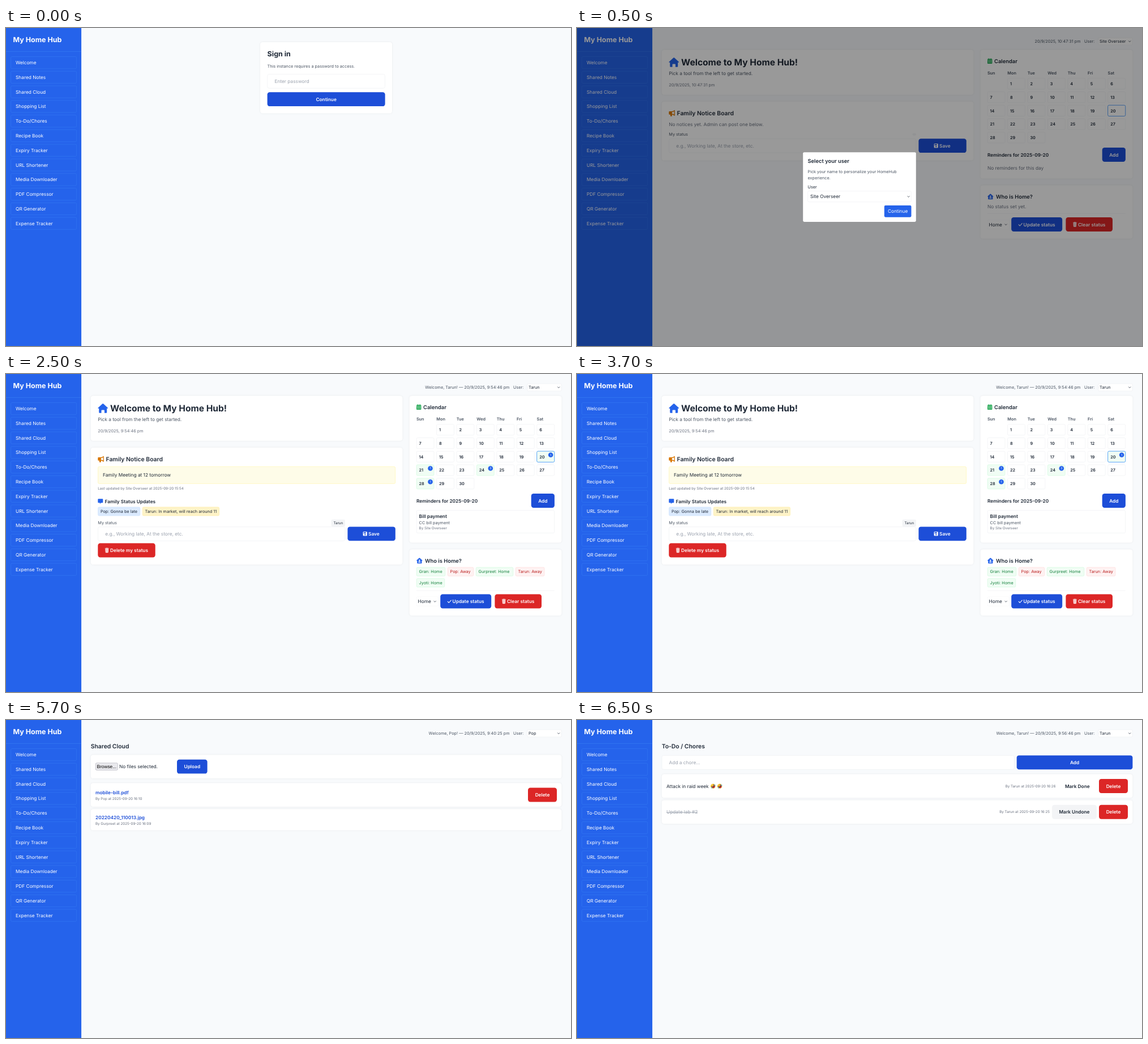
Recreate the animation shown at these times as an HTML page. Size 998 by 561 pixels, loop 8000 ms.

```html
<!DOCTYPE html>
<html lang="en">
<head>
<meta charset="utf-8">
<title>My Home Hub</title>
<style>
html, body { margin: 0; width: 100%; height: 100%; overflow: hidden; background: #f8fafc; }
svg { display: block; width: 100vw; height: 100vh; }
text { font-family: Inter, "Open Sans", sans-serif; font-optical-sizing: none; text-rendering: geometricPrecision; white-space: pre; }
.card { filter: drop-shadow(0 .6px 1.4px rgba(0, 0, 0, .07)); }
</style>
</head>
<body>
<svg id="stage" viewBox="0 0 998 561" preserveAspectRatio="none"></svg>
<script>
const K = 998 / 1920; // page pixels to stage units
const INK = '#1f2937', SLATE = '#4b5563', GRAY = '#6b7280', PALE = '#9ca3af', LINE = '#e5e7eb';
const BLUE = '#2563eb', DEEP = '#1d4ed8', RED = '#dc2626';
const ADMIN = 'Site Overseer', SON = 'Tarun', FATHER = 'Pop', COUSIN = 'Gurpreet';

// y is the middle of the capital letters
const text = (x, y, s, px, fill = INK, weight = 400, extra = '') =>
  `<text x="${x}" y="${y + px * K * .364}" font-size="${px * K}" fill="${fill}" font-weight="${weight}" ${extra}>${s}</text>`;
const bold = (x, y, s, px = 16, fill = INK, extra = '') => text(x, y, s, px, fill, 600, extra);
const END = 'text-anchor="end"', MID = 'text-anchor="middle"';

const rect = (x, y, x2, y2, fill, r = 0, extra = '') =>
  `<rect x="${x}" y="${y}" width="${x2 - x}" height="${y2 - y}" rx="${r}" fill="${fill}" ${extra}/>`;
const box = (x, y, x2, y2, fill, line = LINE, r = 2, w = .42) =>
  rect(x + w / 2, y + w / 2, x2 - w / 2, y2 - w / 2, fill, r, `stroke="${line}" stroke-width="${w}"`);
const card = (x, y, x2, y2) => rect(x, y, x2, y2, '#fff', 4.16, 'class="card"');
const path = (d, fill, extra = '') => `<path d="${d}" fill="${fill}" ${extra}/>`;
const stroke = (d, color, w) => path(d, 'none', `stroke="${color}" stroke-width="${w}" stroke-linecap="round" stroke-linejoin="round"`);
const at = (x, y, body, k = 1) => `<g transform="translate(${x} ${y}) scale(${k})">${body}</g>`;

const button = (x, y, x2, label, fill = DEEP, color = '#fff') =>
  rect(x, y, x2, y + 24.9, fill, 4.16) + bold((x + x2) / 2, y + 12.5, label, 16, color, MID);
const iconButton = (x, y, x2, icon, gap, label, fill) =>
  rect(x, y, x2, y + 24.9, fill, 4.16) + at(x + gap[0], y + 12.5, icon) + bold(x + gap[1], y + 12.5, label, 16, '#fff');
const input = (x, y, x2, hint) => box(x, y, x2, y + 25.2, '#fff', LINE, 3) + text(x + 12.9, y + 12.6, hint, 16, PALE);
const chevron = (x, y) => stroke(`M${x - 1.7} ${y - .8}l1.7 1.7l1.7-1.7`, INK, .75);
const chip = (x, y, x2, s, [fill, line, color]) =>
  box(x, y, x2, y + 15.7, fill, line) + text(x + 4.6, y + 7.9, s, 14, color);

// Icons centred on the vertical axis, starting at x = 0
const FLOPPY = rect(0, -3.7, 7.3, 3.7, '#fff', 1) + rect(1.2, -2.7, 5.2, -.7, DEEP, .2) + `<circle cx="3.65" cy="1.5" r="1.1" fill="${DEEP}"/>`;
const TRASH = rect(0, -3.8, 6.8, -2.8, '#fff', .4) + rect(2.1, -4.3, 4.7, -3.2, '#fff', .4)
  + path('M.5-2.3h5.8l-.4 5.5q-.1.9-.9.9h-3.200q-.8 0-.9-.9z', '#fff')
  + stroke('M2-1v3.700M3.400-1v3.700M4.800-1v3.700', RED, .4);
const CHECK = stroke('M.6.3l2.100 2.100l4-4.400', '#fff', 1.1);
const HOUSE = path('M9 0q.5 0 .8.300L17.700 7.500q.6.900-.5 1.100h-1.200v6.900q0 1-1 1h-3.300v-4.300q0-1-1-1h-3.400q-1 0-1 1v4.300h-3.300q-1 0-1-1v-6.900h-1.200q-1.100-.2-.5-1.100L8.200.300q.3-.3.8-.3z', BLUE);
const HOME_USER = path('M9 0q.5 0 .8.300L17.700 7.500q.6.900-.5 1.100h-1.200v6.900q0 1-1 1h-12q-1 0-1-1v-6.900h-1.200q-1.100-.2-.5-1.100L8.200.300q.3-.3.8-.3z', BLUE)
  + '<circle cx="9" cy="7.400" r="2" fill="#fff"/>' + path('M5.300 13.700q0-3.300 3-3.300h1.400q3 0 3 3.300z', '#fff');
const HORN = path('M0 3.300q0-1 1-1h4q2.600-.1 4.700-2.100q.5-.4.800.3v9.200q-.3.700-.8.300q-1.900-1.800-4.200-2.100v2.300q0 .7-.7.700h-1.500q-.7 0-.7-.7v-2.300h-1.600q-1 0-1-1z', '#d97706')
  + path('M5.500 3.700q2.100-.2 3.700-1.400v5.400q-1.600-1.100-3.700-1.300z', '#fff');
const COMMENT = path('M1 0h7q1 0 1 1v5q0 1-1 1h-2.300l-2.200 1.800v-1.800h-2.500q-1 0-1-1v-5q0-1 1-1z', BLUE);
const CALENDAR = rect(0, 1.2, 8.4, 9.500, '#16a34a', 1) + rect(1.8, 0, 2.800, 2.500, '#16a34a', .4) + rect(5.600, 0, 6.600, 2.500, '#16a34a', .4)
  + rect(0, 3.1, 8.4, 3.6, '#fff')
  + [0, 1, 2].map(i => rect(1.1 + i * 2.400, 4.700, 2.500 + i * 2.400, 5.900, '#fff', .2) + rect(1.1 + i * 2.400, 7, 2.500 + i * 2.400, 8.200, '#fff', .2)).join('');
const LAUGH = '<g transform="rotate(-40)"><circle r="4.300" fill="#ffc83d"/>'
  + path('M-2.800.1h5.600q-.2 3.400-2.800 3.400t-2.800-3.400z', '#7a2436') + path('M-1.700 2.600q1.700-1.500 3.400 0q-1.700 1.600-3.400 0z', '#f03a50')
  + stroke('M-2.700-1.700l1.500.7l-1.500.6M2.700-1.700l-1.500.7l1.500.6', '#50321e', .6)
  + '<circle cx="-3.500" cy=".8" r="1" fill="#3f9ee8"/><circle cx="3.500" cy=".8" r="1" fill="#3f9ee8"/></g>';

const GREEN_TAG = ['#f0fdf4', '#bbf7d0', '#15803d'], RED_TAG = ['#fef2f2', '#fecaca', '#b91c1c'];

function sidebar() {
  const items = ['Welcome', 'Shared Notes', 'Shared Cloud', 'Shopping List', 'To-Do/Chores', 'Recipe Book', 'Expiry Tracker',
    'URL Shortener', 'Media Downloader', 'PDF Compressor', 'QR Generator', 'Expense Tracker'];
  return rect(0, 0, 133.07, 561, BLUE) + text(12.5, 20.9, 'My Home Hub', 24, '#fff', 700)
    + rect(0, 41.5, 133.07, 42, '#3b82f6')
    + items.map((s, i) => {
      const y = 50.3 + i * 25.78;
      return box(8.3, y, 124.8, y + 21.6, 'none', '#3b82f6') + text(17.05, y + 10.8, s, 16, '#fff');
    }).join('');
}

const topBar = (status, user) => text(889.5, 23.5, status, 14, SLATE, 400, END) + text(896, 23.5, 'User:', 14, SLATE)
  + box(920.5, 16.800, 981.4, 30.200, '#fff') + text(923, 23.5, user, 14) + chevron(976.2, 23.600);

function signIn() {
  return card(449.1, 24.950, 682, 150.6) + text(461.6, 45.9, 'Sign in', 24, INK, 700)
    + text(461.6, 67.8, 'This instance requires a password to access.', 14, SLATE)
    + input(461.6, 81.3, 669.600, 'Enter password') + button(461.6, 113.200, 669.600, 'Continue');
}

function month(counts) {
  const left = 724.9, step = 35.44;
  let out = ['Sun', 'Mon', 'Tue', 'Wed', 'Thu', 'Fri', 'Sat'].map((d, i) => bold(left + i * step, 79.4, d, 14, SLATE)).join('');
  for (let day = 1; day <= 30; day++) {
    const x = left + day % 7 * step, y = 88.6 + Math.floor(day / 7) * 23.75, n = counts[day];
    out += box(x, y, x + 31.3, y + 19.5, n ? '#f0fdf4' : '#fff', n ? '#bbf7d0' : LINE);
    if (day === 20) out += box(x - .4, y - .4, x + 31.7, y + 19.900, 'none', '#60a5fa', 2.200, 1);
    out += bold(x + 4.600, y + 9.8, day, 14);
    if (n) out += `<circle cx="${x + 24.6}" cy="${y + 6.600}" r="4.300" fill="${BLUE}"/>` + text(x + 24.6, y + 6.600, n, 10, '#fff', 400, MID);
  }
  return out;
}

const saveRow = y => text(162.3, y - 7.400, 'My status', 14, SLATE)
  + input(162.3, y, 599, 'e.g., Working late, At the store, etc.')
  + iconButton(603.4, y, 687.800, FLOPPY, [27.200, 36.700], 'Save', DEEP);

const homeControls = y => rect(725, y - 6.800, 968.9, y - 6.400, LINE)
  + box(725, y + 4, 763.500, y + 21, '#fff', '#f3f4f6') + text(727.5, y + 12.5, 'Home', 16) + chevron(757.600, y + 12.700)
  + iconButton(767.2, y, 857.2, CHECK, [12.400, 21.400], 'Update status', DEEP)
  + iconButton(863.4, y, 946, TRASH, [12.600, 21.600], 'Clear status', RED);

function dashboard(d) {
  return topBar(d.status, d.user)
    + card(149.7, 38.600, 700.4, 117.700) + at(162.2, 52.2, HOUSE)
    + text(184, 60.6, 'Welcome to My Home Hub!', 30, INK, 700)
    + text(162.3, 80.4, 'Pick a tool from the left to get started.', 16, SLATE)
    + text(162.3, 100.4, d.time, 14, GRAY)
    + card(149.7, 129.800, 700.4, d.boardEnd) + at(162.3, 144.8, HORN) + bold(176.5, 150.1, 'Family Notice Board', 20)
    + card(712.6, 38.600, 981.4, d.calEnd) + at(725, 53.4, CALENDAR) + bold(737, 58.600, 'Calendar', 18)
    + month(d.counts) + bold(725, 223.600, 'Reminders for 2025-09-20') + button(927.700, 211, 968.9, 'Add')
    + card(712.6, d.calEnd + 12, 981.4, d.homeEnd) + at(725, d.calEnd + 26.900, HOME_USER, .59)
    + bold(740, d.calEnd + 31.900, 'Who is Home?', 18) + homeControls(d.controls) + d.body;
}

function pickUser() {
  const time = '20/9/2025, 10:47:31 pm';
  return dashboard({
    status: time, time, user: ADMIN, boardEnd: 233.600, calEnd: 265.600, homeEnd: 371.600, controls: 334.1, counts: {},
    body: text(162.3, 169.6, 'No notices yet. Admin can post one below.', 16, GRAY) + saveRow(195.2)
      + rect(592.500, 185.500, 599, 189.800, '#f3f4f6', 2)
      + text(725, 246.500, 'No reminders for this day', 16, GRAY) + text(725, 315, 'No status set yet.', 16, GRAY)
  }) + rect(0, 0, 998, 561, '#000', 0, 'opacity=".4"')
    + rect(399.2, 219.2, 598.800, 341.9, '#fff', 2.1)
    + bold(407.5, 234.800, 'Select your user', 18)
    + text(407.5, 253.700, 'Pick your name to personalize your HomeHub', 14, SLATE) + text(407.5, 264.1, 'experience.', 14, SLATE)
    + text(407.5, 280.600, 'User', 14) + box(407.5, 287.600, 590.500, 307, '#fff') + text(412, 297.300, ADMIN, 16)
    + chevron(585.600, 297.500) + rect(542.8, 313, 590.500, 333.700, BLUE, 2.1) + text(566.600, 323.300, 'Continue', 16, '#fff', 400, MID);
}

function home() {
  const time = '20/9/2025, 9:54:46 pm';
  return dashboard({
    status: `Welcome, ${SON}! — ${time}`, time, user: SON, boardEnd: 336.200, calEnd: 297.500, homeEnd: 426.200, controls: 388.6,
    counts: { 20: 1, 21: 1, 24: 3, 28: 1 },
    body: box(162.3, 163.2, 687.800, 193.600, '#fefce8', '#fef08a') + text(171, 178.400, 'Family Meeting at 12 tomorrow', 16)
      + text(162.3, 201.500, `Last updated by ${ADMIN} at 2025-09-20 15:54`, 12, GRAY)
      + at(162.3, 220.300, COMMENT) + bold(174.500, 224.600, 'Family Status Updates')
      + chip(162.3, 234.600, 237, `${FATHER}: Gonna be late`, ['#dbeafe', '#bfdbfe', INK])
      + chip(241, 234.600, 376.800, `${SON}: In market, will reach around 11`, ['#fef3c7', '#fde68a', INK])
      + rect(574.500, 256.800, 599, 269, '#f3f4f6', 2) + text(586.800, 263, SON, 12, INK, 400, MID)
      + saveRow(269.4) + iconButton(162.3, 298.6, 263.700, TRASH, [12.500, 21.700], 'Delete my status', RED)
      + box(725, 240.400, 968.9, 280.700, '#fff') + bold(729.600, 251.300, 'Bill payment')
      + text(729.600, 262.500, 'CC bill payment', 14, SLATE) + text(729.600, 272.100, `By ${ADMIN}`, 12, GRAY)
      + chip(725, 340.900, 776, 'Gran: Home', GREEN_TAG) + chip(780, 340.900, 826, `${FATHER}: Away`, RED_TAG)
      + chip(830, 340.900, 896, `${COUSIN}: Home`, GREEN_TAG) + chip(900, 340.900, 951.300, `${SON}: Away`, RED_TAG)
      + chip(725, 360.500, 775, 'Jyoti: Home', GREEN_TAG)
  });
}

function cloud() {
  return topBar(`Welcome, ${FATHER}! — 20/9/2025, 9:40:25 pm`, FATHER) + bold(149.7, 46.400, 'Shared Cloud', 20)
    + card(149.7, 61.500, 981.4, 103.100) + box(158, 75.600, 197.600, 88.700, '#e9e9ed', '#8f8f9d')
    + text(177.800, 82.200, 'Browse...', 16, '#000', 400, MID + ' style="font-family:\'Liberation Sans\',Arial,sans-serif"')
    + text(200, 82.400, 'No files selected.', 16) + button(302, 69.700, 355.600, 'Upload')
    + card(149.7, 111.300, 981.4, 153) + bold(158, 128.300, 'mobile-bill.pdf', 16, DEEP)
    + text(158, 139, `By ${FATHER} at 2025-09-20 16:10`, 12, GRAY) + button(922, 119.600, 973, 'Delete', RED)
    + card(149.7, 157.200, 981.4, 194.600) + bold(158, 171.800, '20220420_110013.jpg', 16, DEEP)
    + text(158, 182.400, `By ${COUSIN} at 2025-09-20 16:09`, 12, GRAY);
}

function chores() {
  const meta = (x, y, time) => text(x, y, `By ${SON} at 2025-09-20 ${time}`, 12, GRAY, 400, END);
  return topBar(`Welcome, ${SON}! — 20/9/2025, 9:56:46 pm`, SON) + bold(149.7, 46.400, 'To-Do / Chores', 20)
    + input(149.7, 62.300, 772.600, 'Add a chore...') + button(776.700, 62.400, 981.4, 'Add')
    + card(149.7, 95.600, 981.4, 137.200) + text(158, 116.700, 'Attack in raid week', 16)
    + at(240.300, 116.700, LAUGH) + at(252.100, 116.700, LAUGH) + meta(845.500, 116.500, '16:26')
    + button(849.700, 104.100, 917.900, 'Mark Done', '#fff', INK) + button(922, 104.100, 973, 'Delete', RED)
    + card(149.7, 141.400, 981.4, 183) + text(158, 162.400, 'Update lab #2', 16, PALE, 400, 'text-decoration="line-through"')
    + meta(835, 162.200, '16:25') + button(839.100, 149.800, 917.900, 'Mark Undone', '#f3f4f6', INK)
    + button(922, 149.800, 973, 'Delete', RED);
}

const LOOP = 8000;
const scenes = [[0, signIn], [500, pickUser], [2500, home], [4500, cloud], [6500, chores]];
const stage = document.getElementById('stage');
stage.innerHTML = rect(0, 0, 998, 561, '#f8fafc') + sidebar()
  + scenes.map(([, draw]) => `<g class="scene" display="none">${draw()}</g>`).join('');
const layers = [...stage.querySelectorAll('.scene')];

function render(now) {
  const t = now % LOOP;
  const current = scenes.filter(([start]) => t >= start).length - 1;
  layers.forEach((g, i) => g.setAttribute('display', i === current ? 'inline' : 'none'));
}
function tick() {
  render(performance.now());
  requestAnimationFrame(tick);
}
tick();
</script>
</body>
</html>
```
